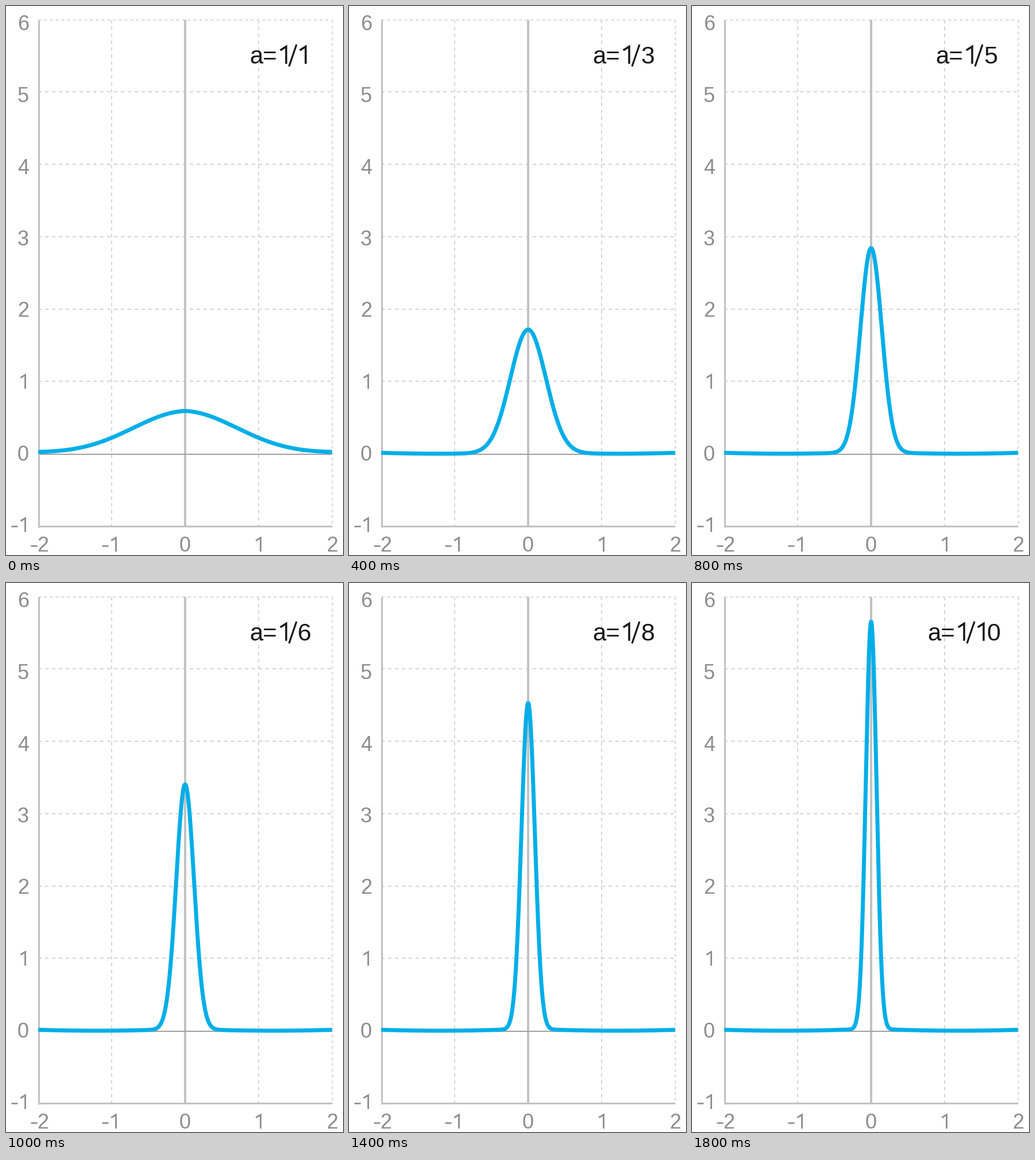
These frames come from a looping animation (587x954 px, 2000 ms). A matplotlib script:

```python
import numpy as np
import matplotlib.pyplot as plt
from matplotlib.animation import FuncAnimation

W, H, DPI = 587, 954, 64
PT = 72 / DPI
STEPS, INTERVAL = 10, 200
CX, UNIT_X, ZERO_Y, UNIT_Y = 312, 128, 778, 125.75
BLUE, GREY, INK = "#00aee8", "#8c8c8c", "#181818"
GRID, BORDER, AXIS = "#d4d4d4", "#e2e2e2", "#c2c2c2"

plt.rcParams["font.family"] = "Liberation Sans"
fig = plt.figure(figsize=(W / DPI, H / DPI), dpi=DPI, facecolor="white")
ax = fig.add_axes([0, 0, 1, 1])
ax.set_xlim(0, W)
ax.set_ylim(H, 0)
ax.axis("off")


def px(v):
    return CX + v * UNIT_X


def py(v):
    return ZERO_Y - v * UNIT_Y


def stroke(xs, ys, color, width, **kw):
    kw.setdefault("solid_capstyle", "butt")
    return ax.plot(xs, ys, color=color, lw=width * PT, **kw)[0]


def dashed(xs, ys, color, width, dash):
    stroke(xs, ys, color, width, dashes=(dash / width, dash / width),
           dash_capstyle="butt")


def write(x, base, s, size, color, ha="left"):
    return ax.text(x, base, s, fontsize=size * PT, color=color, ha=ha,
                   va="baseline", zorder=5)


def one_shape(stem, base, height):
    """A digit one without a foot, placed by its stem."""
    xs = [stem - height * 0.33, stem, stem]
    ys = [base - height * 0.76, base - height + 1, base]
    return xs, ys


def number(v, x, base):
    """A tick label whose digit is centred on x."""
    if abs(v) == 1:
        stroke(*one_shape(x + 3.5, base, 25), GREY, 2.8,
               solid_joinstyle="miter")
    else:
        write(x, base, str(abs(v)), 36, GREY, "center")
    if v < 0:
        stroke([x - 21, x - 10], [base - 10] * 2, GREY, 2.6)


def draw_grid():
    left, right, top, bottom = px(-2), px(2), py(6), py(-1)
    for v in range(1, 6):
        dashed([left, right], [py(v)] * 2, GRID, 2, 6)
    for v in (-1, 1):
        dashed([px(v)] * 2, [top, bottom], GRID, 2, 6)
    dashed([left, right], [top] * 2, BORDER, 3, 5)
    dashed([right] * 2, [top, bottom], BORDER, 3, 5)
    stroke([CX] * 2, [top, bottom], AXIS, 4)
    stroke([left, right], [ZERO_Y + 0.5] * 2, "#a0a0a0", 2)
    stroke([left + 0.5] * 2, [top, bottom + 2], AXIS, 3)
    stroke([left, right], [bottom + 0.5] * 2, AXIS, 3)
    for v in range(-1, 7):
        number(v, 30, 789.5 - 124.5 * v)
    for v in range(-2, 3):
        number(v, px(v) - 4 * min(v, 0), 948)


def bell(n):
    """Normalised Gaussian of width 1/n on a slightly bowed baseline."""
    x = np.linspace(-2, 2, 1201)
    base = ZERO_Y - 2.5 * (np.abs(x) - 1.2) ** 2
    height = 0.997 * n / np.sqrt(np.pi) * UNIT_Y
    return px(x), base - height * np.exp(-(x * n / 1.03) ** 2)


draw_grid()
curve = stroke([], [], BLUE, 7, zorder=4, solid_joinstyle="round")
BASE = 100.5
prefix = write(0, BASE, "a=", 42, INK)
slash = stroke([], [], INK, 3.2, zorder=5)
ones = [stroke([], [], INK, 3.5, zorder=5, solid_joinstyle="miter")
        for _ in range(2)]
digit = write(0, BASE, "", 43, INK)


def update(i):
    n = i + 1
    curve.set_data(*bell(n))
    tail = str(n)
    left = 424 - 14 * (len(tail) - 1)
    prefix.set_x(left)
    slash.set_data([left + 69, left + 82], [105, 67])
    for line, stem in zip(ones, (64, 98)):
        line.set_data(*one_shape(left + stem, BASE, 31))
    ones[1].set_visible(tail[0] == "1")
    digit.set_text(tail.lstrip("1"))
    digit.set_x(left + 84 + 19 * (len(tail) - 1))
    return curve, prefix, slash, *ones, digit


anim = FuncAnimation(fig, update, frames=STEPS, interval=INTERVAL,
                     repeat=True, repeat_delay=0, blit=False)
plt.show()
```
